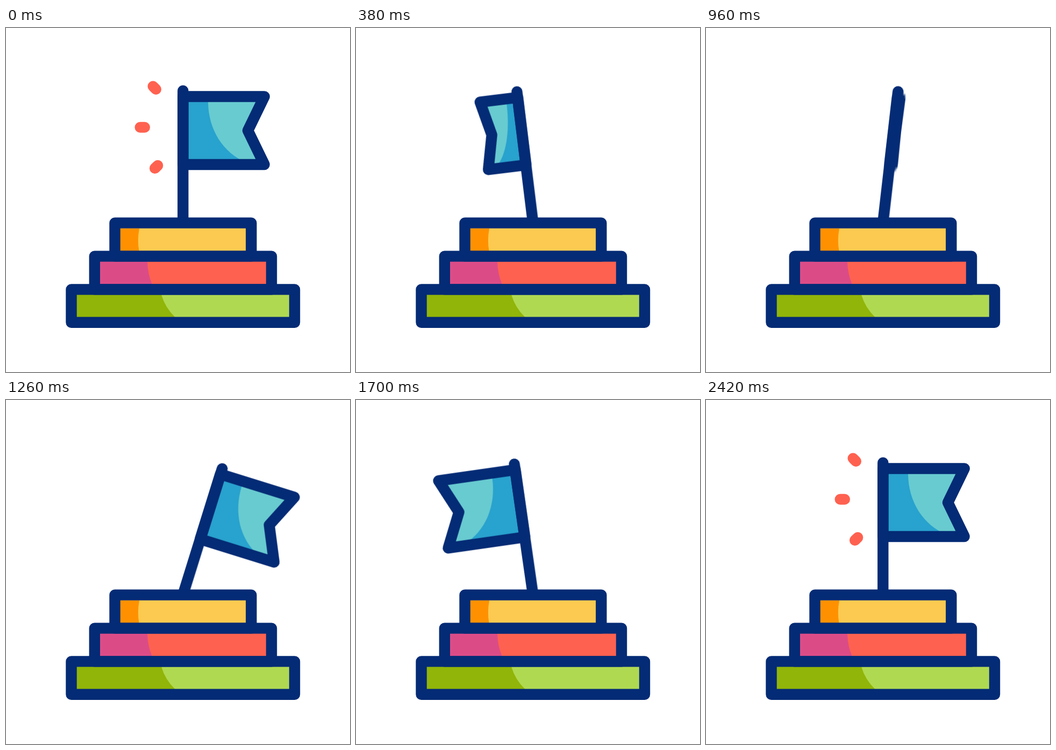
Recreate the animation shown at these times as an HTML page. Size 640 px wide and 640 px high, loop 2.82 s.

```html
<!DOCTYPE html>
<html lang="en">
<head>
<meta charset="utf-8">
<title>Flag on steps</title>
<style>
  html, body { margin: 0; width: 100%; height: 100%; overflow: hidden; background: #fff; }
  svg { display: block; width: 100%; height: 100%; }

  .line {
    fill: none;
    stroke: #042b75;
    stroke-width: 20.4;
    stroke-linecap: round;
    stroke-linejoin: round;
    vector-effect: non-scaling-stroke;
  }
  .pole, .flag { transform-origin: 329.3px 362px; }
  .pole { animation: sway 2820ms infinite; }
  .flag { animation: turn 2820ms infinite; }
  .sparks {
    fill: none;
    stroke: #ff6150;
    stroke-width: 20;
    stroke-linecap: round;
    stroke-dasharray: 1 2;
    animation: spark 2820ms linear infinite;
  }

  /* The second half of each swing mirrors the first in time. */
  @keyframes sway {
    0%       { transform: rotate(0deg);      animation-timing-function: cubic-bezier(.37, 0, .59, 1); }
    21.277%  { transform: rotate(-9.55deg);  animation-timing-function: cubic-bezier(.42, 0, .72, 1); }
    42.553%  { transform: rotate(18.4deg);   animation-timing-function: cubic-bezier(.28, 0, .58, 1); }
    63.83%   { transform: rotate(-9.55deg);  animation-timing-function: cubic-bezier(.41, 0, .63, 1); }
    85.106%, 100% { transform: rotate(0deg); }
  }
  @keyframes turn {
    0%       { transform: scaleX(1);  animation-timing-function: cubic-bezier(.37, 0, .59, 1); }
    21.277%  { transform: scaleX(-1); animation-timing-function: cubic-bezier(.65, 0, .6, 1); }
    42.553%  { transform: scaleX(1);  animation-timing-function: cubic-bezier(.4, 0, .35, 1); }
    63.83%   { transform: scaleX(-1); animation-timing-function: cubic-bezier(.41, 0, .63, 1); }
    85.106%, 100% { transform: scaleX(1); }
  }
  @keyframes spark {
    0%, 7.09%      { stroke-dashoffset: 0; opacity: 1; }
    10.63%         { stroke-dashoffset: 1; opacity: 1; }
    10.64%, 74.46% { stroke-dashoffset: 1; opacity: 0; }
    74.47%         { stroke-dashoffset: 1; opacity: 1; }
    78.01%, 100%   { stroke-dashoffset: 0; opacity: 1; }
  }
</style>
</head>
<body>
<svg viewBox="0 0 640 640">
  <g class="sparks">
    <path pathLength="1" d="M279 114L273.5 108.5"/>
    <path pathLength="1" d="M258 184.8H249.5"/>
    <path pathLength="1" d="M277 261L282.3 255.8"/>
  </g>

  <g class="pole">
    <g class="flag">
      <path fill="#68cbd0" d="M329.3 127.5H480.7L450 190.8L480.7 254H329.3Z"/>
      <path fill="#28a2ce" d="M329.3 127.5H376.3C373 180 398 226 440 247V254H329.3Z"/>
      <path class="line" d="M329.3 127.5H480.7L450 190.8L480.7 254H329.3Z"/>
    </g>
    <path class="line" d="M329.3 116.8V362"/>
  </g>

  <path fill="#fcca50" d="M202.5 362.6H456.3V424.6H202.5Z"/>
  <path fill="#ff9100" d="M202.5 373H248Q244 394 247.5 415H202.5Z"/>
  <path fill="#ff6150" d="M164.8 424.6H494V486.4H164.8Z"/>
  <path fill="#db4c87" d="M164.8 434H263Q263.5 458 272 477H164.8Z"/>
  <path fill="#b0d952" d="M121.5 486.4H537V547.7H121.5Z"/>
  <path fill="#91b508" d="M121.5 496H289Q296 520 314.5 538H121.5Z"/>
  <path class="line" d="M202.5 362.6H456.3V424.6H202.5Z"/>
  <path class="line" d="M164.8 424.6H494V486.4H164.8Z"/>
  <path class="line" d="M121.5 486.4H537V547.7H121.5Z"/>
</svg>
</body>
</html>
```
